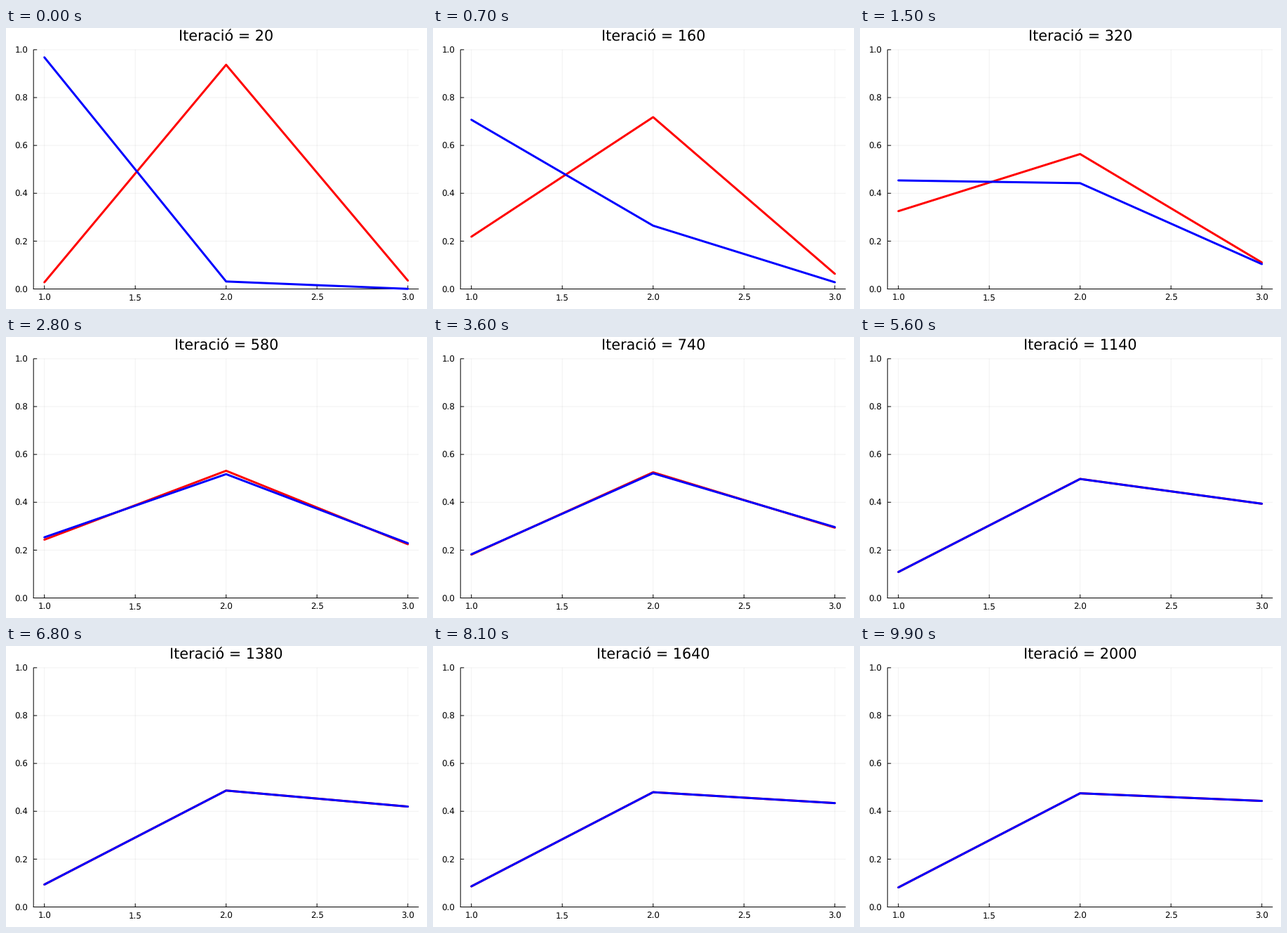
A matplotlib script for the animation above (10000 ms loop, 600 by 400 pixels).

```python
import numpy as np
import matplotlib.pyplot as plt
from matplotlib.animation import FuncAnimation

W, H, DPI = 600, 400, 100
FRAMES, STEP = 100, 20
PX = 72 / DPI
LEFT, RIGHT, BASE = 39.2, 588.2, 371.5

plt.rcParams["font.family"] = "DejaVu Sans"
plt.rcParams["text.hinting"] = "none"


def px(x):
    return 54.7 + 259 * (np.asarray(x) - 1)


def py(y):
    return BASE - 340.6 * np.asarray(y)


def distribution(n, side):
    """Three probabilities after n iterations; side is -1 or 1."""
    # Shared drift towards the equilibrium, slow at first
    drift = 1.79 * (1 + np.exp(0.007 * (n - 410))) ** -0.371
    # The gap between the two curves dies out exponentially
    gap = side * 4.1 * np.exp(-0.0083 * n)
    # Log ratios of the outer states to the middle one
    first = drift - 1.79 + gap
    last = (-0.05 - drift * (0.68 + 1.55 * np.exp(-0.0052 * n))
            + gap * (n - 100) / 700)
    weights = np.exp([first, 0, last])
    return weights / weights.sum()


fig = plt.figure(figsize=(W / DPI, H / DPI), dpi=DPI, facecolor="white")
ax = fig.add_axes([0, 0, 1, 1])
ax.set_xlim(0, W)
ax.set_ylim(H, 0)
ax.axis("off")


def rule(xs, ys, **style):
    ax.plot(xs, ys, color="black", lw=PX, snap=False,
            solid_capstyle="butt", **style)


def label(x, y, text, size, ha="center"):
    return ax.text(x, y, text, fontsize=size * PX, ha=ha, va="baseline")


for x in np.arange(1, 3.1, 0.5):
    rule([px(x)] * 2, [py(1), BASE], alpha=0.055, zorder=1)
    rule([px(x)] * 2, [BASE, BASE - 5], zorder=2)
    label(px(x), 388, f"{x:.1f}", 11.9)

for y in np.arange(0, 1.1, 0.2):
    rule([LEFT, RIGHT], [py(y)] * 2, alpha=0.055, zorder=1)
    rule([LEFT, LEFT + 5], [py(y)] * 2, zorder=2)
    label(31.6, py(y) + 5, f"{y:.1f}", 11.9, ha="right")

rule([LEFT - 0.5, RIGHT], [BASE, BASE], zorder=2)
rule([LEFT, LEFT], [py(1), BASE], zorder=2)

title = label((LEFT + RIGHT) / 2, 19, "", 20.8)
curves = [
    (ax.plot([], [], color=color, lw=3 * PX, solid_capstyle="round",
             solid_joinstyle="round", zorder=3)[0], side)
    for color, side in (("#ff0000", -1), ("#0000ff", 1))
]


def update(frame):
    n = STEP * (frame + 1)
    title.set_text(f"Iteració = {n}")
    for line, side in curves:
        line.set_data(px([1, 2, 3]), py(distribution(n, side)))
    return [title] + [line for line, _ in curves]


anim = FuncAnimation(fig, update, frames=FRAMES, interval=100,
                     repeat=True, repeat_delay=0, blit=False)
plt.show()
```
